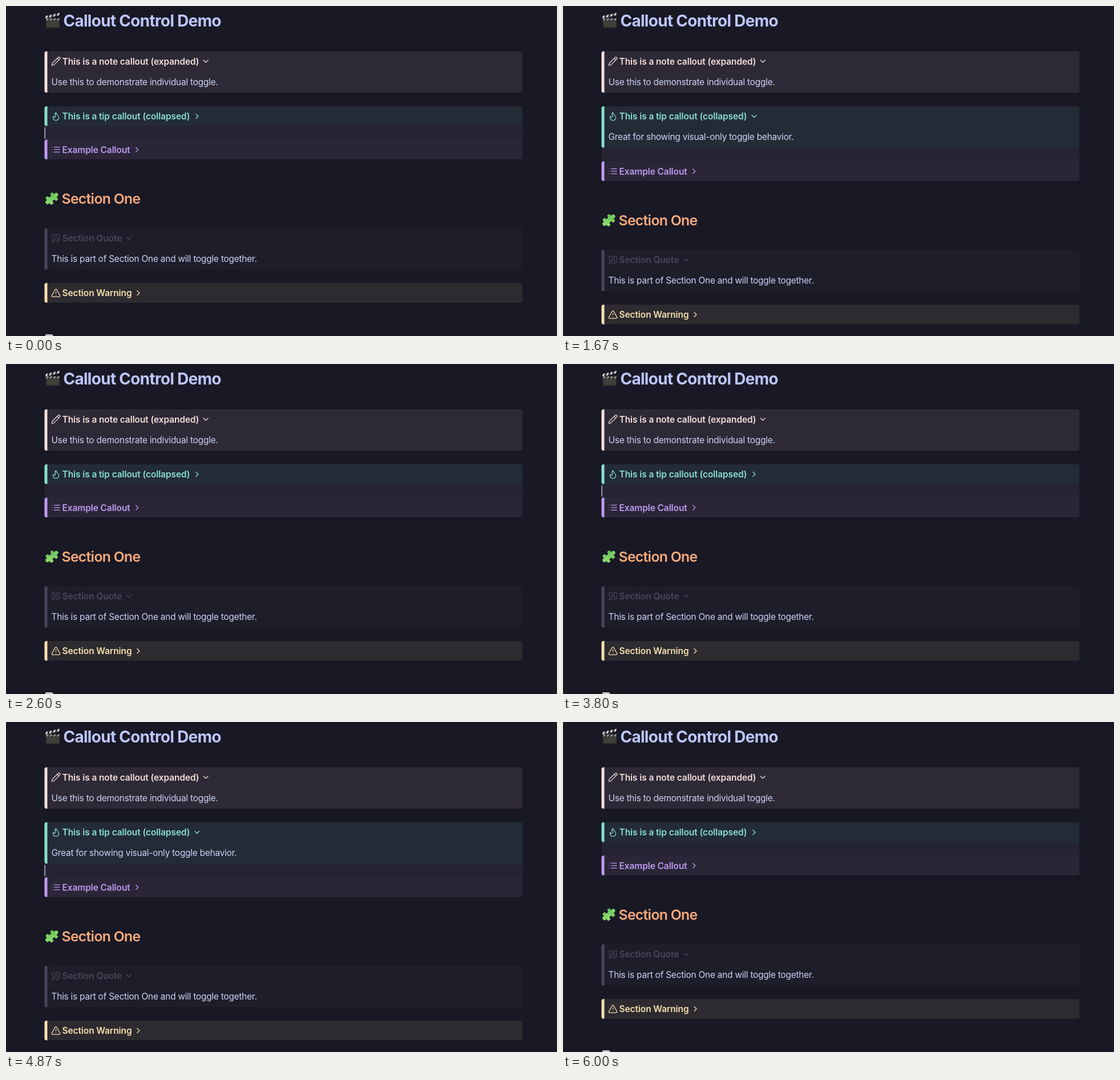
An HTML page for the animation above (6140 ms loop, 966x579 px).

```html
<!DOCTYPE html>
<html lang="en">
<head>
<meta charset="utf-8">
<title>Callout Control Demo</title>
<style>
  html, body { margin: 0; width: 966px; height: 579px; overflow: hidden; background: #191825; }
  svg { display: block; }
  text { font: 400 15.5px Inter, sans-serif; font-optical-sizing: none; }
  .title { font-weight: 600; letter-spacing: -0.1px; }
  .body { fill: #cad3f5; letter-spacing: -0.27px; }
  .h1 { font-size: 27.9px; font-weight: 700; letter-spacing: -0.67px; fill: #bcc6fb; }
  .h2 { font-size: 24.8px; font-weight: 600; letter-spacing: -0.72px; fill: #f9aa7b; }
  .line { fill: none; stroke-linecap: round; stroke-linejoin: round; }
</style>
</head>
<body>
<svg id="stage" width="966" height="579" viewBox="0 0 966 579"></svg>
<script>
const LOOP = 6140;
const LEFT = 67.5, RIGHT = 905.5;
const TITLE_H = 34.5, OPEN_H = 72.5, SHIFT = 38;

const quoteMark = x => `M${x} 3a2 2 0 0 0-2 2v6a2 2 0 0 0 2 2 1 1 0 0 1 1 1v1a2 2 0 0 1-2 2
  1 1 0 0 0-1 1v2a1 1 0 0 0 1 1 6 6 0 0 0 6-6V5a2 2 0 0 0-2-2z`;

const ICONS = {
  pencil: `M21.2 6.8a1 1 0 0 0-4-4L3.8 16.2a2 2 0 0 0-.5.8L2 21.4a.5.5 0 0 0 .6.6L7 20.7a2 2 0 0 0 .8-.5zM15 5l4 4`,
  flame: `M8.5 14.5A2.5 2.5 0 0 0 11 12c0-1.4-.5-2-1-3-1.1-2.1-.2-4 2-6 .5 2.5 2 4.9 4 6.5
    2 1.6 3 3.5 3 5.5a7 7 0 1 1-14 0c0-1.2.4-2.3 1-3a2.5 2.5 0 0 0 2.5 2.5z`,
  list: 'M8 6h13M8 12h13M8 18h13M3 6h.01M3 12h.01M3 18h.01',
  quote: quoteMark(16) + quoteMark(5),
  warning: 'M21.7 18l-8-14a2 2 0 0 0-3.5 0l-8 14A2 2 0 0 0 4 21h16a2 2 0 0 0 1.7-3M12 9v4M12 17h.01'
};

const text = (cls, x, y, str, fill) =>
  `<text class="${cls}" x="${x}" y="${y}"${fill ? ` fill="${fill}"` : ''}>${str}</text>`;

const rect = (x, y, w, h, fill, rx = 0) =>
  `<rect x="${x}" y="${y}" width="${w}" height="${h}" rx="${rx}" fill="${fill}"/>`;

const chevron = (x, y, open, color) =>
  `<path class="line" stroke="${color}" stroke-width="1.25"
    transform="translate(${x} ${y}) rotate(${open ? 90 : 0})" d="M-2-4L2 0L-2 4"/>`;

function callout({ y, icon, title, body, color, bg, foldX }) {
  const h = body ? OPEN_H : TITLE_H;
  const mid = y + TITLE_H / 2 + 0.2;
  return rect(LEFT, y, RIGHT - LEFT, h, bg, 4) +
    `<path fill="${color}" d="M${LEFT + 5} ${y}v${h}h-1.5a3.5 3.5 0 0 1-3.5-3.5v${7 - h}a3.5 3.5 0 0 1 3.5-3.5z"/>` +
    `<path class="line" stroke="${color}" stroke-width="1.65"
      transform="translate(78.8 ${mid - 8.75}) scale(.73)" d="${ICONS[icon]}"/>` +
    text('title', 98.5, y + 23, title, color) +
    chevron(foldX, mid, !!body, color) +
    (body ? text('body', 79.5, y + 59, body) : '');
}

function clapper() {
  let stripes = '', rows = '';
  for (let i = 0; i < 4; i++) {
    stripes += `<path d="M${2 + i * 7} 0h3.4l-2.4 4.2h-3.4z" fill="#d6d6d3"/>`;
  }
  for (let i = 0; i < 3; i++) rows += rect(71.5, 28 + i * 3.2, 21, 0.8, '#62655a');
  const bar = (place, opacity) =>
    `<g transform="${place}" opacity="${opacity}">${rect(0, 0, 26, 4.2, '#34343a', 1)}${stripes}</g>`;
  return rect(70, 22, 24, 16.5, '#33342e', 1.5) + rows +
    bar('translate(70 21.6) scale(.92 .9)', 0.6) +
    bar('translate(68.3 17.8) rotate(-13)', 1);
}

function puzzle() {
  const dot = (x, y, r, fill) => `<circle cx="${x}" cy="${y}" r="${r}" fill="${fill}"/>`;
  return `<g transform="translate(80.3 337.8) rotate(-40)">
    ${rect(-8.2, -8.2, 16.4, 16.4, 'url(#leaf)', 1.8)}
    ${dot(10, 0, 3.5, '#7ad367')}${dot(-10, 0, 3.5, '#84d86b')}
    ${dot(0, -6.8, 2.8, '#191825')}${dot(0, 6.8, 2.8, '#191825')}
  </g>`;
}

const tip = {
  y: 176, icon: 'flame', title: 'This is a tip callout (collapsed)',
  color: '#88e0cd', bg: '#232b37', foldX: 335
};

document.getElementById('stage').innerHTML = `
  <defs><linearGradient id="leaf" x1="1" y1="0" x2="0" y2="1">
    <stop offset="0" stop-color="#5dbb55"/><stop offset="1" stop-color="#98e373"/>
  </linearGradient></defs>
  ${clapper()}
  ${text('h1', 100.5, 35.5, 'Callout Control Demo')}
  ${callout({ y: 79.5, icon: 'pencil', title: 'This is a note callout (expanded)',
    body: 'Use this to demonstrate individual toggle.', color: '#f3dfda', bg: '#2e2936', foldX: 350.3 })}
  <g id="below">
    ${rect(LEFT, 208, RIGHT - LEFT, 30, '#242433')}
    ${callout({ y: 234.5, icon: 'list', title: 'Example Callout', color: '#bf9af2', bg: '#2a2637', foldX: 229.8 })}
    <g id="caret">${rect(67.5, 213, 1.3, 19.5, '#cad3f5')}</g>
    ${puzzle()}
    ${text('h2', 97.5, 347, 'Section One')}
    ${callout({ y: 390, icon: 'quote', title: 'Section Quote',
      body: 'This is part of Section One and will toggle together.', color: '#46475a', bg: '#1e1d2a', foldX: 215.5 })}
    ${callout({ y: 486, icon: 'warning', title: 'Section Warning', color: '#f7e0ae', bg: '#2d2a30', foldX: 232 })}
    <path d="M69 600v-22.5q0-1.5 1.5-1.5h10l5 5v19z" fill="#c9c9cc"/>
  </g>
  <g id="closed">${callout(tip)}</g>
  <g id="open">${callout({ ...tip, body: 'Great for showing visual-only toggle behavior.' })}</g>`;

const [below, caret, closedTip, openTip] =
  ['below', 'caret', 'closed', 'open'].map(id => document.getElementById(id));
const show = (el, on) => el.setAttribute('visibility', on ? 'visible' : 'hidden');

function render(t) {
  const open = (t >= 1670 && t < 2600) || (t >= 3930 && t < 5000);
  show(openTip, open);
  show(closedTip, !open);
  below.setAttribute('transform', `translate(0 ${open ? SHIFT : 0})`);
  show(caret, t < 6000 && (t + 200) % 1000 < 530);
}

const start = performance.now();
function tick() {
  render((performance.now() - start) % LOOP);
  requestAnimationFrame(tick);
}
tick();
</script>
</body>
</html>
```
